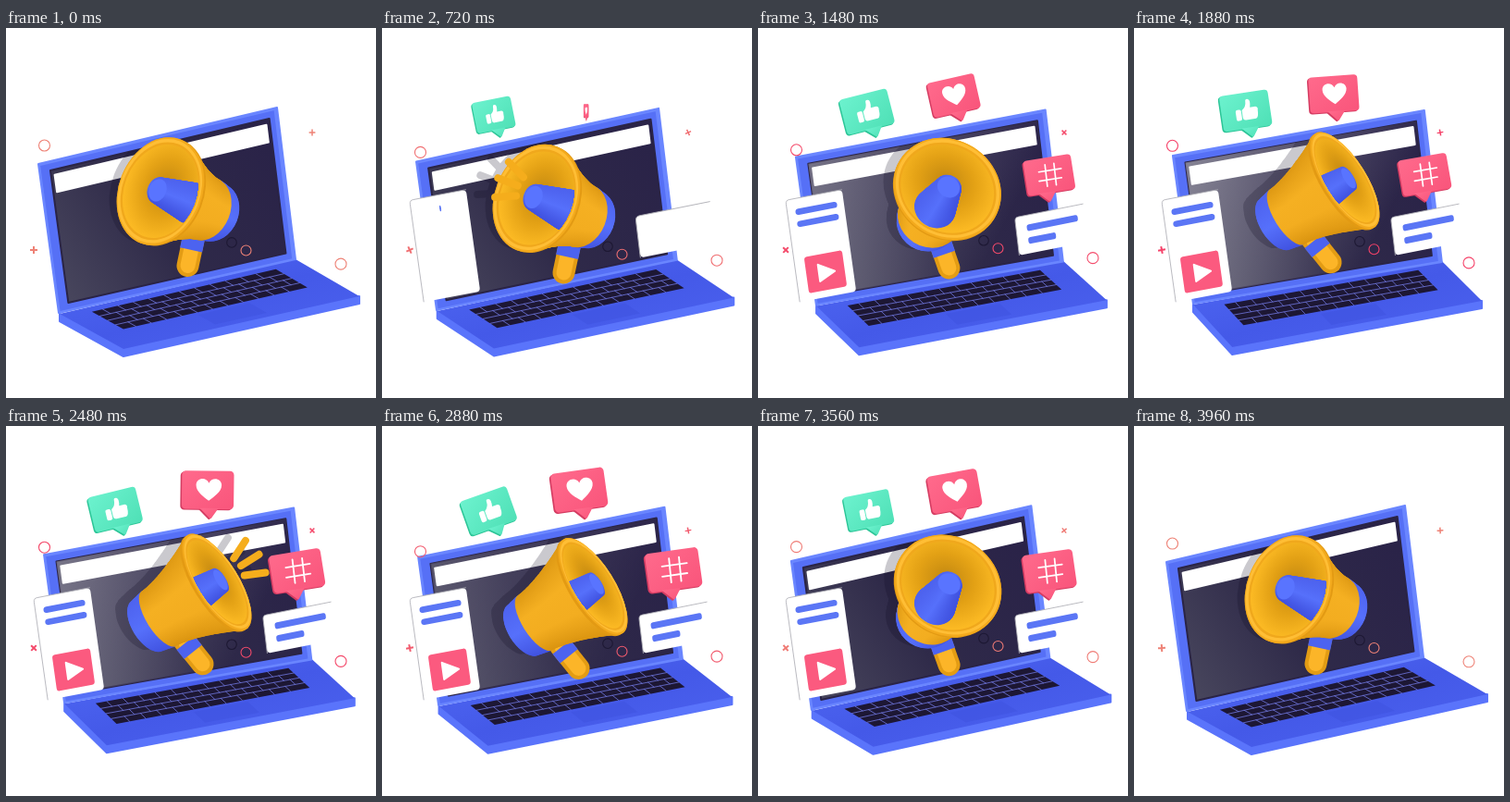
Write an HTML page that moves like this. It is 400 px wide and 400 px high and loops after 4000 ms.

```html
<!DOCTYPE html>
<html lang="en">
<head>
<meta charset="utf-8">
<title>Megaphone on a laptop</title>
<style>
html, body { margin: 0; width: 100%; height: 100%; overflow: hidden; background: #fff; }
svg { display: block; width: 400px; height: 400px; }
</style>
</head>
<body>
<svg viewBox="0 0 400 400">
  <defs>
    <linearGradient id="dark" x1="0" y1=".8" x2="1" y2=".3">
      <stop offset="0" stop-color="#47455c"/><stop offset=".45" stop-color="#2f2a49"/><stop offset="1" stop-color="#2a2348"/>
    </linearGradient>
    <linearGradient id="sheen" x1="0" y1=".3" x2=".8" y2=".6">
      <stop offset="0" stop-color="#fff" stop-opacity=".38"/><stop offset="1" stop-color="#fff" stop-opacity="0"/>
    </linearGradient>
    <linearGradient id="deck" x1="0" y1="0" x2="1" y2="1">
      <stop offset="0" stop-color="#5069f4"/><stop offset=".5" stop-color="#4459e8"/><stop offset="1" stop-color="#4d63f0"/>
    </linearGradient>
    <linearGradient id="gold" x1="0" y1="0" x2="0" y2="1">
      <stop offset="0" stop-color="#dd9813"/><stop offset=".35" stop-color="#f5b022"/><stop offset=".65" stop-color="#f3ad20"/><stop offset="1" stop-color="#d9930f"/>
    </linearGradient>
    <linearGradient id="blue" x1="0" y1="0" x2="0" y2="1">
      <stop offset="0" stop-color="#4d62ee"/><stop offset=".5" stop-color="#5670fb"/><stop offset="1" stop-color="#4052e0"/>
    </linearGradient>
    <radialGradient id="mouth" cx=".55" cy=".45" r=".55">
      <stop offset="0" stop-color="#c08610"/><stop offset=".55" stop-color="#e3a115"/><stop offset="1" stop-color="#fbb923"/>
    </radialGradient>
    <linearGradient id="mint" x1="0" y1="0" x2="1" y2="1">
      <stop offset="0" stop-color="#6cf2ce"/><stop offset="1" stop-color="#4fe0b6"/>
    </linearGradient>
    <linearGradient id="rose" x1="0" y1="0" x2="1" y2="1">
      <stop offset="0" stop-color="#ff6a8c"/><stop offset="1" stop-color="#f9557b"/>
    </linearGradient>
  </defs>
  <g id="scene"></g>
</svg>
<script>
const LOOP = 4000;
const scene = document.getElementById('scene');
const clamp = v => Math.max(0, Math.min(1, v));
const mix = (a, b, k) => a + (b - a) * k;
const mixPt = (a, b, k) => a.map((v, i) => mix(v, b[i], k));
const wave = (t, peak = 0, period = 2000) => Math.cos(2 * Math.PI * (t - peak) / period);
const smooth = p => (1 - Math.cos(Math.PI * clamp(p))) / 2;
const easeOut = p => 1 - (1 - clamp(p)) ** 2;
const n = v => +v.toFixed(2);

const poly = (list, fill, extra = '') =>
  `<polygon points="${list.map(p => p.map(n)).join(' ')}" fill="${fill}" ${extra}/>`;
const line = (a, b, color, w, cap = 'round') =>
  `<path d="M${a.map(n)}L${b.map(n)}" stroke="${color}" stroke-width="${n(w)}" stroke-linecap="${cap}" fill="none"/>`;
const box = (x, y, w, h, r, fill) => w < .1 ? '' :
  `<rect x="${n(x)}" y="${n(y)}" width="${n(w)}" height="${h}" rx="${r}" fill="${fill}"/>`;
const round = c => `stroke="${c}" stroke-width="2" stroke-linejoin="round"`;

// Grows in at `start`, folds away at `end`
const life = (t, start, end) => easeOut((t - start) / 220) * (1 - smooth((t - end) / 260));

// Corners of the two halves of the laptop at both ends of the sway
const LID = [[[35, 147], [293, 86], [313, 250], [57, 308]], [[42, 138], [314, 89], [333, 253], [64, 298]]];
const DECK = [[[58, 309], [313, 250], [382, 290], [127, 347]], [[64, 299], [333, 252], [376, 295], [106, 345]]];

// A tilted plane: maps 0..1 coordinates to the stage
function plane([from, to], u) {
  const [a, b, c, d] = from.map((p, i) => mixPt(p, to[i], u));
  const at = (x, y) => mixPt(mixPt(a, b, x), mixPt(d, c, x), y);
  const rect = (x, y, X, Y) => [at(x, y), at(X, y), at(X, Y), at(x, Y)];
  return { at, rect };
}

function keyboard(deck) {
  const rows = 4, cols = 12, color = '#7078e0';
  const on = (x, y) => deck.at(mix(.108, .888, x), mix(.106, .6, y));
  let out = poly([on(0, 0), on(1, 0), on(1, 1), on(0, 1)], '#1d1734');
  for (let r = 0; r < rows; r++) {
    if (r) out += line(on(0, r / rows), on(1, r / rows), color, .8);
    for (let c = 1; c < cols; c++) {
      const x = (c + (r * .37) % 1 - .3) / cols;
      out += line(on(x, r / rows), on(x, (r + 1) / rows), color, .8);
    }
  }
  return out;
}

function laptop(t) {
  const u = (1 - wave(t, 0, LOOP)) / 2;
  const lid = plane(LID, u), deck = plane(DECK, u);
  const edge = [deck.at(0, 0), deck.at(0, 1), deck.at(1, 1)];
  const drop = edge.map(([x, y]) => [x, y + 8]).reverse();
  const screen = lid.rect(.045, .06, .963, .948);
  return `<clipPath id="glass">${poly(screen, '#000')}</clipPath>` +
    poly([...edge, ...drop], '#5a74fb', round('#5a74fb')) +
    poly(deck.rect(0, 0, 1, 1), 'url(#deck)') +
    poly(deck.rect(.41, .65, .63, .92), '#4054e2', 'opacity=".6"') + keyboard(deck) +
    poly(lid.rect(0, 0, 1, 1), '#6a86ff', round('#6a86ff')) +
    poly(lid.rect(.007, .015, .986, .99), '#5670f6') +
    poly(screen, 'url(#dark)', round('#2a2446')) +
    poly(screen, 'url(#sheen)', `opacity="${n(clamp((u - .3) / .7))}"`) +
    poly(lid.rect(.06, .095, .948, .21), '#fff', round('#fff'));
}

// Horn profile along its axis
const LENGTH = 96, NECK = 16;
function radius(s) {
  if (s < 0) return 32 * Math.sqrt(1 - (s / 12) ** 2);
  if (s < NECK) return 32 + s * .2;
  return 35 + 25 * ((s - NECK) / (LENGTH - NECK)) ** 1.45;
}

function megaphone(t) {
  // 0 looks left, 1 looks right
  const side = smooth((t - 1020) / 800) - smooth((t - 3290) / 650);
  const [dx, dy] = mixPt([-59, -23], [75, -47], side);
  const mid = [mix(196.5, 190.5, side), 192.6 - 4.6 * wave(t)];
  const tilt = Math.sqrt(1 - (dx * dx + dy * dy) / LENGTH ** 2);
  const turn = Math.atan(dy / (dx || .01)) * 180 / Math.PI;
  const along = s => [mid[0] + dx * (s / LENGTH - .5), mid[1] + dy * (s / LENGTH - .5)];
  const disc = (s, r, fill) =>
    `<ellipse rx="${n(r * tilt)}" ry="${n(r)}" fill="${fill}" transform="translate(${along(s).map(n)}) rotate(${n(turn)})"/>`;

  let body = '', shade = '', core = '';
  for (let s = -12; s <= LENGTH; s += 2) {
    body += disc(s, radius(s), s < NECK ? 'url(#blue)' : 'url(#gold)');
    if (s % 4 === 0) shade += disc(s, radius(s), '#100c22');
  }
  for (let s = 42; s <= 101; s++) core += disc(s, mix(23, 14.5, (s - 42) / 59), 'url(#blue)');
  core += disc(101, 12.5, '#5974ff');

  const a = mixPt([7, 36], [2, 40], side).map((v, i) => v + mid[i]);
  const b = mixPt([0, 69], [22, 65], side).map((v, i) => v + mid[i]);
  const handle = line(a, b, '#e39c14', 24) + line(mixPt(a, b, .12), b, '#fcb528', 16) +
    line(mixPt(a, b, .08), mixPt(a, b, .48), '#4c63f0', 24.5, 'butt');

  const lip = disc(LENGTH - 3, 60, '#e39a13') + disc(LENGTH, 60, '#f3aa1d') +
    disc(LENGTH + 1, 58, '#ffbe35') + disc(LENGTH + .5, 54.5, '#f0a81c') + disc(LENGTH, 52, 'url(#mouth)');
  const inside = `<clipPath id="hole">${disc(LENGTH, 52, '#000')}</clipPath><g clip-path="url(#hole)">${core}</g>`;
  const fan = color => rays(t, along(LENGTH), Math.atan2(dy, dx), color);
  return `<g clip-path="url(#glass)" opacity=".22"><g transform="translate(${n(mix(-8, -13, side))} -2)">${shade}</g>` +
    `<g transform="translate(-19 -3)">${fan('#100c22')}</g></g>` +
    handle + body + lip + inside + fan('#f5ad1c');
}

// Three strokes fan out of the mouth, once per direction
function rays(t, [x, y], aim, color) {
  const p = (t - (t < 1500 ? 480 : 2240)) / 480;
  if (p <= 0 || p >= 1) return '';
  const head = mix(26, 49, easeOut(p * 2.2)), tail = mix(26, 49, smooth(p * 2.2 - 1.2));
  const width = 8 * Math.min(1, p * 5, (1 - p) * 5);
  return [-1, 0, 1].map(k => {
    const angle = aim + k * .43;
    const at = d => [x + 4 + d * Math.cos(angle), y - 4 + d * Math.sin(angle)];
    return line(at(tail), at(head), color, width);
  }).join('');
}

const place = (x, y, move, art) => `<g transform="translate(${x} ${y}) ${move}">${art}</g>`;

// White sheet with a thin line on its upper left edges
const sheet = (w, h) => box(-w, -h, 2 * w, 2 * h, 4, '#fff') +
  `<path d="M${w} ${-h}H${4 - w}Q${-w} ${-h} ${-w} ${4 - h}V${h}" fill="none" stroke="#b0b0b6" stroke-width=".8"/>`;

const INK = '#5b76f5';

function phone(t) {
  const s = life(t, 420, 3620);
  const bar = (y, start) => {
    const w = 45 * easeOut((t - start) / 200);
    return box(.7 - w / 2, y - 3.3, w, 6.6, 3.3, INK);
  };
  const play = box(-20.5, -19.5, 41, 39, 3, '#fb5a7f') + poly([[-7, -9], [10, 1], [-7, 9]], '#fff', round('#fff'));
  return place(68, 235.5, `matrix(1 -.19 .14 1 0 0) scale(${n(s)})`,
    sheet(30.5, 55) + bar(-40.4, 717) + bar(-27.3, 790) +
    place(1, 28.2, `scale(${n(easeOut((t - 850) / 220))})`, play));
}

function note(t) {
  const s = life(t, 480, 3600) * (1 + .09 * Math.sin(Math.PI * clamp((t - 480) / 480)));
  const bar = (y, w, start) => box(-25.5, y - 3.5, w * easeOut((t - start) / 440), 7, 2.5, INK);
  return place(317, 218, `matrix(1 -.2 .12 1 0 0) scale(${n(s)})`,
    sheet(37, 20.5) + bar(-6.8, 55, 820) + bar(7, 30, 1080));
}

const THUMB = '<rect x="-12" y="-2" width="6" height="12" rx="2" fill="#fff"/>' +
  '<path d="M-5 -1Q0 -4 0 -10Q0 -13 3 -12Q6 -11 4 -3H10Q13 -2 12 1Q12 9 9 10H-2Q-5 10 -5 7Z" fill="#fff"/>';
const HEART = '<path d="M0 11C-5 7 -13 2 -13 -5C-13 -12 -3 -14 0 -7C3 -14 13 -12 13 -5C13 2 5 7 0 11Z" fill="#fff"/>';
const HASH = '<path d="M-4 -12L-5 12M6 -12L5 12M-12 -5H13M-13 5H12" stroke="#fff" stroke-width="1.7" stroke-linecap="round"/>';

// Speech bubble whose origin is the tip of its tail
function bubble(cx, fill, edge, icon) {
  const w = 26.5, h = 19.5, cy = -29.5, low = cy + h - 1;
  const shape = color => box(cx - w, cy - h, 2 * w, 2 * h, 4, color) +
    `<path d="M-11 ${low}L-1 -1Q0 0 1 -1L8 ${low}Z" fill="${color}"/>`;
  return place(-1.5, 1, '', shape(edge)) + shape(fill) + place(cx + 1, cy, '', icon);
}
const LIKE = bubble(-4, 'url(#mint)', '#2cc597', THUMB);
const LOVE = bubble(-3, 'url(#rose)', '#d53c62', HEART);
const TAG = bubble(3.5, 'url(#rose)', '#d53c62', HASH);

function bubbles(t) {
  const swell = 1.04 + .06 * wave(t, 3300, LOOP);
  const pop = (x, y, start, art, angle, size) => {
    const s = life(t, start, 3520);
    return s < .005 ? '' : place(x, y,
      `rotate(${n(angle * s * s)}) scale(${n(s * size)} ${n((.3 + .7 * s) * size)})`, art);
  };
  return pop(129, 118, 600, LIKE, -14 + 6 * wave(t), 1) +
    pop(221, 100.5, 710, LOVE, -6 + 8 * wave(t, 2300), swell) +
    pop(316, 188, 820, TAG, -9 - wave(t), swell);
}

function sparks(t) {
  const warm = (1 + wave(t, 0, LOOP)) / 2;
  const color = `rgb(${mixPt([245, 65, 105], [238, 130, 118], warm).map(Math.round)})`;
  const ring = (x, y, r, c = color) =>
    `<circle cx="${x}" cy="${n(y)}" r="${r}" fill="none" stroke="${c}" stroke-width="1.1"/>`;
  const plus = (x, y, r, w) => place(x, y, `rotate(${n(t * 360 / LOOP)})`,
    `<path d="M${-r} 0H${r}M0 ${-r}V${r}" stroke="${color}" stroke-width="${w}"/>`);
  const y = 241.5 + 3.5 * wave(t, 600);
  return {
    under: ring(244, y - 8.5, 5.3, '#1d1833'),
    over: ring(41.5, 131.5 - 4.5 * wave(t), 6) + ring(259.5, y, 5.5) + ring(362, 251.5 + 4.5 * wave(t, 200), 6) +
      plus(30, 240, 4, 2) + plus(331, 113, 3.4, 1.5)
  };
}

function draw(t) {
  const s = sparks(t);
  scene.innerHTML = laptop(t) + s.under + megaphone(t) + phone(t) + note(t) + bubbles(t) + s.over;
}

const begin = performance.now();
function tick() {
  draw((performance.now() - begin) % LOOP);
  requestAnimationFrame(tick);
}
tick();
</script>
</body>
</html>
```
